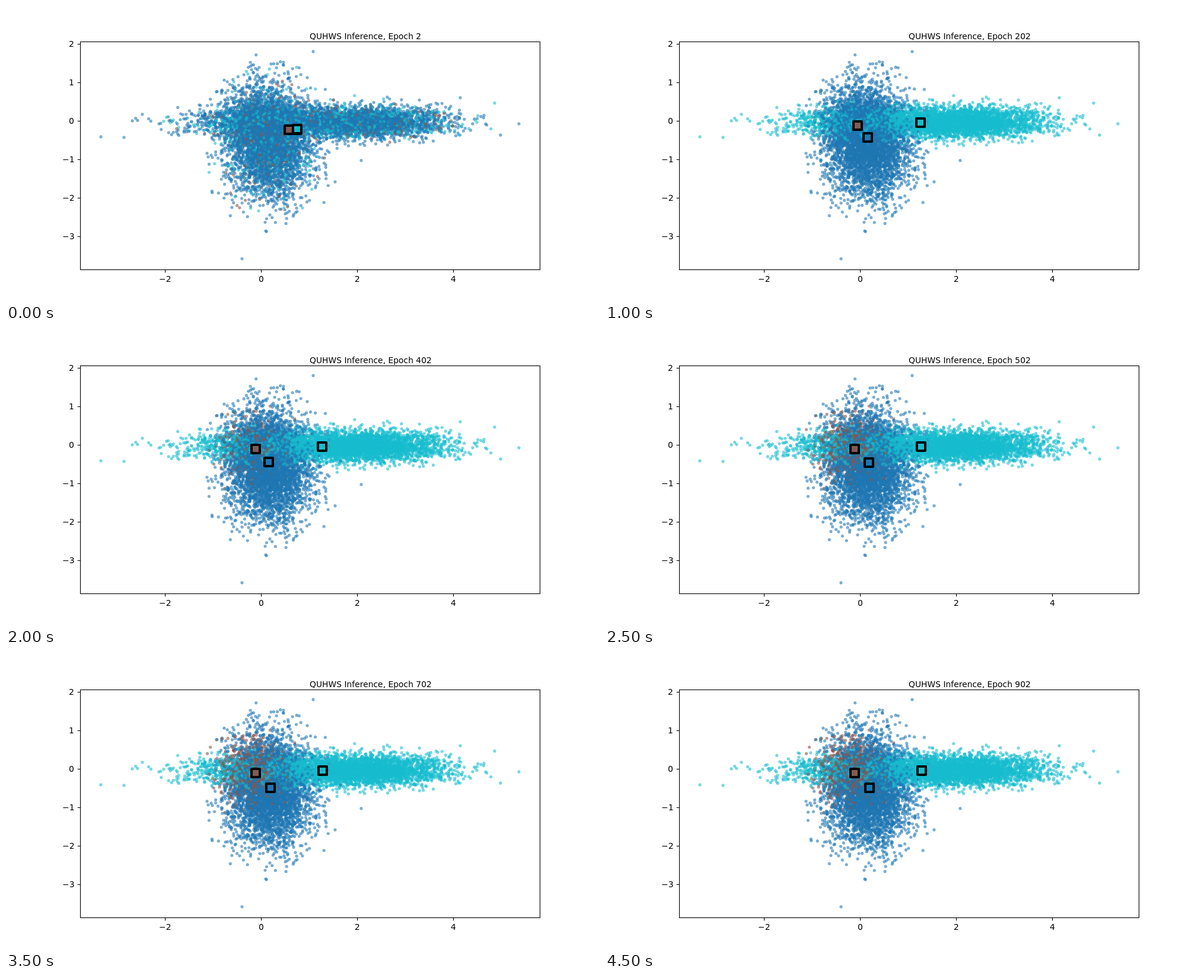
These frames come from a looping animation (1000x500 px, 5000 ms). An HTML page with a canvas:

```html
<!DOCTYPE html>
<html lang="en">
<head>
<meta charset="utf-8">
<title>Mixture inference</title>
<style>
  html, body { margin: 0; width: 100%; height: 100%; overflow: hidden; background: #fff; }
  canvas { display: block; }
</style>
</head>
<body>
<canvas id="stage" width="1000" height="500"></canvas>
<script>
const ctx = document.getElementById('stage').getContext('2d');
const BLUE = '#1f77b4', BROWN = '#8c564b', CYAN = '#17becf';
const STEP = 500, STEPS = 10;

// Share of points, mean, standard deviation
const clusters = [
  { kind: 'tall', share: 0.42, x: 446, y: 230, sx: 35, sy: 46 },
  { kind: 'wide', share: 0.37, x: 596, y: 196, sx: 71, sy: 13.2 },
  { kind: 'wide', share: 0.11, x: 425, y: 196, sx: 66, sy: 13.5 },
  { kind: 'small', share: 0.10, x: 419, y: 201, sx: 27, sy: 24 }
];

let seed = 20;
function random() {
  seed = (seed + 0x6D2B79F5) | 0;
  let t = Math.imul(seed ^ (seed >>> 15), 1 | seed);
  t = (t + Math.imul(t ^ (t >>> 7), 61 | t)) ^ t;
  return ((t ^ (t >>> 14)) >>> 0) / 4294967296;
}

function smoothstep(from, to, value) {
  const t = Math.min(Math.max((value - from) / (to - from), 0), 1);
  return t * t * (3 - 2 * t);
}

function makePoint(kind, x, y) {
  return { kind, x, y, early: random(), late: random() };
}

function randomPoint() {
  let pick = random();
  const c = clusters.find(c => (pick -= c.share) < 0) || clusters[0];
  // The factor below 1 keeps the radius within 3.4 deviations
  const radius = Math.sqrt(-2 * Math.log(1 - 0.997 * random()));
  const angle = random() * 2 * Math.PI;
  return makePoint(c.kind, c.x + c.sx * radius * Math.cos(angle), c.y + c.sy * radius * Math.sin(angle));
}

const points = Array.from({ length: 9800 }, randomPoint);
for (const [x, y] of [[398, 427], [438, 380], [518, 77], [555, 297], [599, 261]]) {
  points.push(makePoint('tall', x, y));
}
for (const [x, y] of [[160, 221], [199, 222], [213, 194], [766, 155], [824, 164], [834, 218], [865, 199]]) {
  points.push(makePoint('wide', x, y));
}

function pointColour({ kind, y, early, late }, step) {
  if (step === 0) {
    if (early < 0.05) return BROWN;
    return early < (kind === 'wide' ? 0.27 : 0.15) ? CYAN : BLUE;
  }
  if (kind === 'wide') return CYAN;
  let brown = 0;
  if (step === 1) brown = y < 215 ? 0.2 : 0.06;
  else if (kind === 'small') brown = 0.95 * smoothstep(2.4, 6, step);
  return late < brown ? BROWN : BLUE;
}

// Each centre settles geometrically; blue drifts on as the small cluster forms
function clusterCentres(step) {
  const drift = smoothstep(3, 7, step);
  return [
    [BLUE, 443 + 47 * 0.03 ** step + 3 * drift, 222 - 13 * 0.08 ** step + 4 * drift],
    [BROWN, 421 + 56 * 0.3 ** step, 200.5 + (8.5 + 320 * step) * 0.05 ** step],
    [CYAN, 533 - 42 * 0.15 ** step + drift, 197 + 10.5 * 0.1 ** step]
  ];
}

function line(x1, y1, x2, y2) {
  ctx.beginPath();
  ctx.moveTo(x1, y1);
  ctx.lineTo(x2, y2);
  ctx.stroke();
}

function drawPoints(step) {
  ctx.globalAlpha = 0.5;
  ctx.lineWidth = 1.39;
  for (const p of points) {
    ctx.fillStyle = ctx.strokeStyle = pointColour(p, step);
    ctx.beginPath();
    ctx.arc(p.x, p.y, 1.95, 0, 2 * Math.PI);
    ctx.fill();
    ctx.stroke();
  }
  ctx.globalAlpha = 1;
}

function drawCentres(step) {
  ctx.strokeStyle = '#000';
  ctx.lineWidth = 4;
  ctx.lineJoin = 'round';
  for (const [colour, x, y] of clusterCentres(step)) {
    const box = [Math.round(x) - 7, Math.round(y) - 7, 14, 14];
    ctx.globalAlpha = 0.9;
    ctx.fillStyle = colour;
    ctx.fillRect(...box);
    ctx.globalAlpha = 1;
    ctx.strokeRect(...box);
  }
}

// Tick labels start on whole pixels; align is the part of the width left of x
function drawLabel(value, x, y, align) {
  const text = String(value).replace('-', '\u2212');
  ctx.fillText(text, Math.round(x - align * ctx.measureText(text).width), y);
}

function drawAxes(step) {
  ctx.font = '13.89px "DejaVu Sans", sans-serif';
  ctx.fillStyle = ctx.strokeStyle = '#000';
  ctx.lineWidth = 1.11;
  ctx.lineJoin = 'miter';
  ctx.strokeRect(125.5, 60.5, 775, 385);
  for (let v = -2; v <= 4; v += 2) {
    const x = Math.floor(430.4 + 80.9 * v) + 0.5;
    line(x, 445.5, x, 450.4);
    drawLabel(v, x, 466, 0.5);
  }
  for (let v = -3; v <= 2; v++) {
    const y = 194 - 65 * v;
    line(120.6, y + 0.5, 125.5, y + 0.5);
    drawLabel(v, 115.3, y + 5, 1);
  }
  ctx.fillText(`QUHWS Inference, Epoch ${2 + 100 * step}`, 512, 56);
}

let shown = -1;
function render() {
  const step = Math.floor(performance.now() / STEP) % STEPS;
  if (step !== shown) {
    shown = step;
    ctx.fillStyle = '#fff';
    ctx.fillRect(0, 0, 1000, 500);
    drawPoints(step);
    drawCentres(step);
    drawAxes(step);
  }
  requestAnimationFrame(render);
}
render();
</script>
</body>
</html>
```
